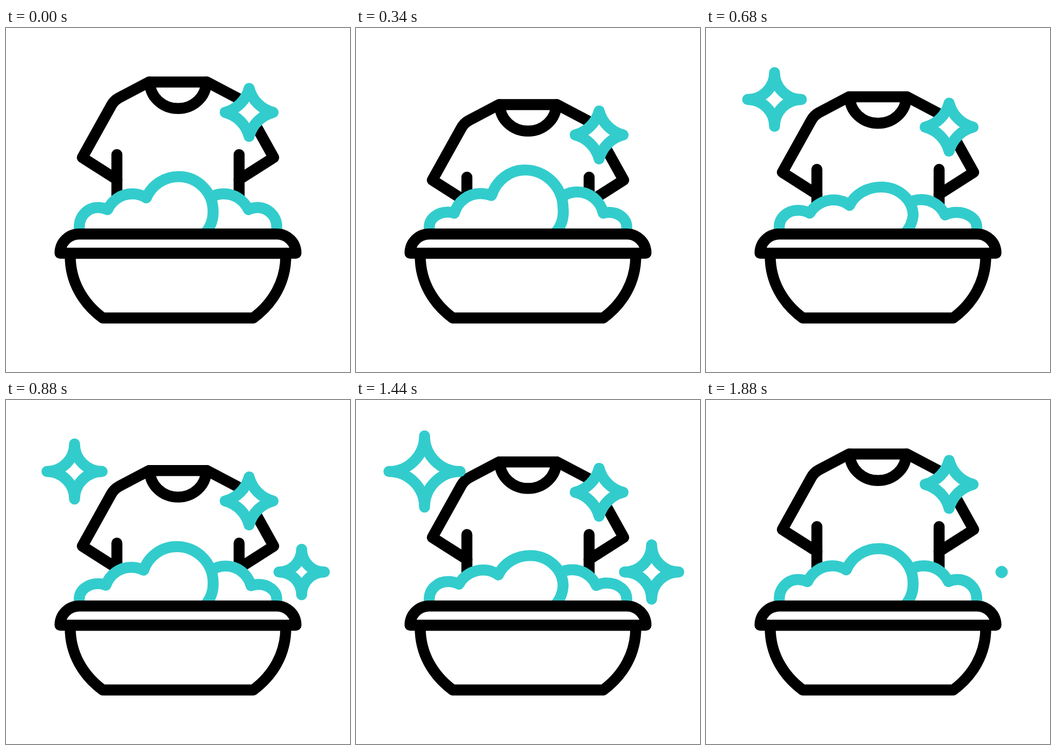
An HTML page that plays this animation: 640 by 640 pixels, repeating every 1900 ms.

```html
<!DOCTYPE html>
<html lang="en">
<head>
<meta charset="utf-8">
<title>Hand wash</title>
<style>
  html, body { margin: 0; width: 100%; height: 100%; overflow: hidden; background: #fff; }
  svg { display: block; width: 100%; height: 100%; }
  path { fill: #fff; stroke: #000; stroke-width: 20.4; stroke-linecap: round; stroke-linejoin: round; }
  .line { fill: none; }
  .teal { stroke: #33cccc; }
</style>
</head>
<body>
<svg viewBox="0 0 640 640">
  <g id="shirt">
    <path class="line" d="M206.3 282 L142 241 L196 144 Q201 135 210 130 L266 100.5 H374 L430 130 Q439 135 444 144 L498 241 L433.7 282"/>
    <path class="line" d="M206.3 235.5 V345 M433.7 235.5 V345"/>
    <path class="line" d="M267.5 100.5 A52.5 49.3 0 0 0 372.5 100.5"/>
    <path class="teal" id="badge" transform="translate(452.3 157)"/>
  </g>
  <path class="teal" id="foamRight"/>
  <path class="teal" id="foamLeft"/>
  <path d="M119.5 419 V424 C119.5 472 143 512 180 539.5 H460 C497 512 520.5 472 520.5 424 V419 Z"/>
  <path d="M100.5 419 A35.7 35.7 0 0 1 136 383.2 H504 A35.7 35.7 0 0 1 539.5 419 Z"/>
  <path class="teal" id="starLeft" transform="translate(127.5 133)"/>
  <path class="teal" id="starRight" transform="translate(550 320)"/>
</svg>
<script>
const LOOP = 1900;
const STAR_SIZE = 67;
const STAR_DELAY = 220;
const FLOOR = 370;
const el = id => document.getElementById(id);

// Motions as [time, value] steps, eased in and out
const DIP = [[0, 0], [417, 46], [770, 24], [1070, 46], [1666, 0]];
const POP = [[520, 0], [760, 1], [900, 0.754], [1300, 0.754], [1425, 1], [1683, 0]];
const SWELL = [[0, 0], [330, 1], [660, -0.7], [950, 0.75], [1320, -0.6], [1666, 0]];
const SINK = [[0, 0], [330, 1], [1320, 1], [1666, 0]];

function eased(steps, t) {
  const i = steps.findIndex(step => step[0] > t);
  if (i === 0) return steps[0][1];
  if (i < 0) return steps[steps.length - 1][1];
  const [t0, v0] = steps[i - 1], [t1, v1] = steps[i];
  const u = (t - t0) / (t1 - t0);
  return v0 + (v1 - v0) * u * u * (3 - 2 * u);
}

// Elliptic arc to (x, y) between a bump's top and a point dx, dy away
function arc(x, y, dx, dy, ry) {
  const k = 1 - dy / Math.max(ry, dy);
  const rx = Math.abs(dx) / Math.sqrt(1 - k * k);
  return `A${rx} ${Math.max(ry, dy)} 0 0 1 ${x} ${y}`;
}

// Bump from a joint over its top to the next joint
function bump([x0, y0], [tx, ty], [x1, y1], ry) {
  return arc(tx, ty, tx - x0, y0 - ty, ry) + arc(x1, y1, x1 - tx, y1 - ty, ry);
}

function drawFoam(t) {
  const swell = eased(SWELL, t), sink = eased(SINK, t);
  // Resting point, pushed sideways and up by the swell
  const point = (x, y, push, lift, drop = 6.5) =>
    [x + push * swell, y - lift * swell + drop * sink];

  const start = [136.3, FLOOR];
  const small = point(171, 334, 0, -2);
  const joint = point(189, 338, -6, 0);
  const middle = point(235, 308.5, -4, 7);
  const dent = point(261, 316, -9, 11);
  const big = point(321, 276.5, -7, 19);
  const side = [385.3, 341 + 0.42 * (big[1] - 276.5)];
  el('foamLeft').setAttribute('d', `M136.3 390 V${FLOOR}`
    + bump(start, small, joint, FLOOR - small[1])
    + bump(joint, middle, dent, 50.5)
    + bump(dent, big, side, side[1] - big[1])
    + 'A60 60 0 0 1 372 380');

  const second = point(405, 308.5, 6.5, 8.5, 5);
  const behind = [second[0] - 25, second[1] + 7];
  const notch = point(451, 338, 9, 2, 8.5);
  const last = point(468, 334, 3, 0, 9);
  el('foamRight').setAttribute('d', `M${behind}`
    + bump(behind, second, notch, 50.5)
    + bump(notch, last, [503.7, FLOOR], FLOOR - last[1])
    + 'V390 H372');
}

function starPath(r, bend) {
  const a = `A${bend} ${bend} 0 0 0 `;
  return `M0 ${-r}${a}${r} 0${a}0 ${r}${a}${-r} 0${a}0 ${-r}Z`;
}

function drawStar(id, t) {
  const r = STAR_SIZE * eased(POP, t);
  el(id).setAttribute('d', r > 0 ? starPath(r, r) : '');
}

function draw(t) {
  el('shirt').setAttribute('transform', `translate(0 ${eased(DIP, t)})`);
  drawFoam(t);
  drawStar('starLeft', t);
  drawStar('starRight', t - STAR_DELAY);
}

el('badge').setAttribute('d', starPath(44.6, 62));
const begin = performance.now();
function tick() {
  draw((performance.now() - begin) % LOOP);
  requestAnimationFrame(tick);
}
tick();
</script>
</body>
</html>
```
